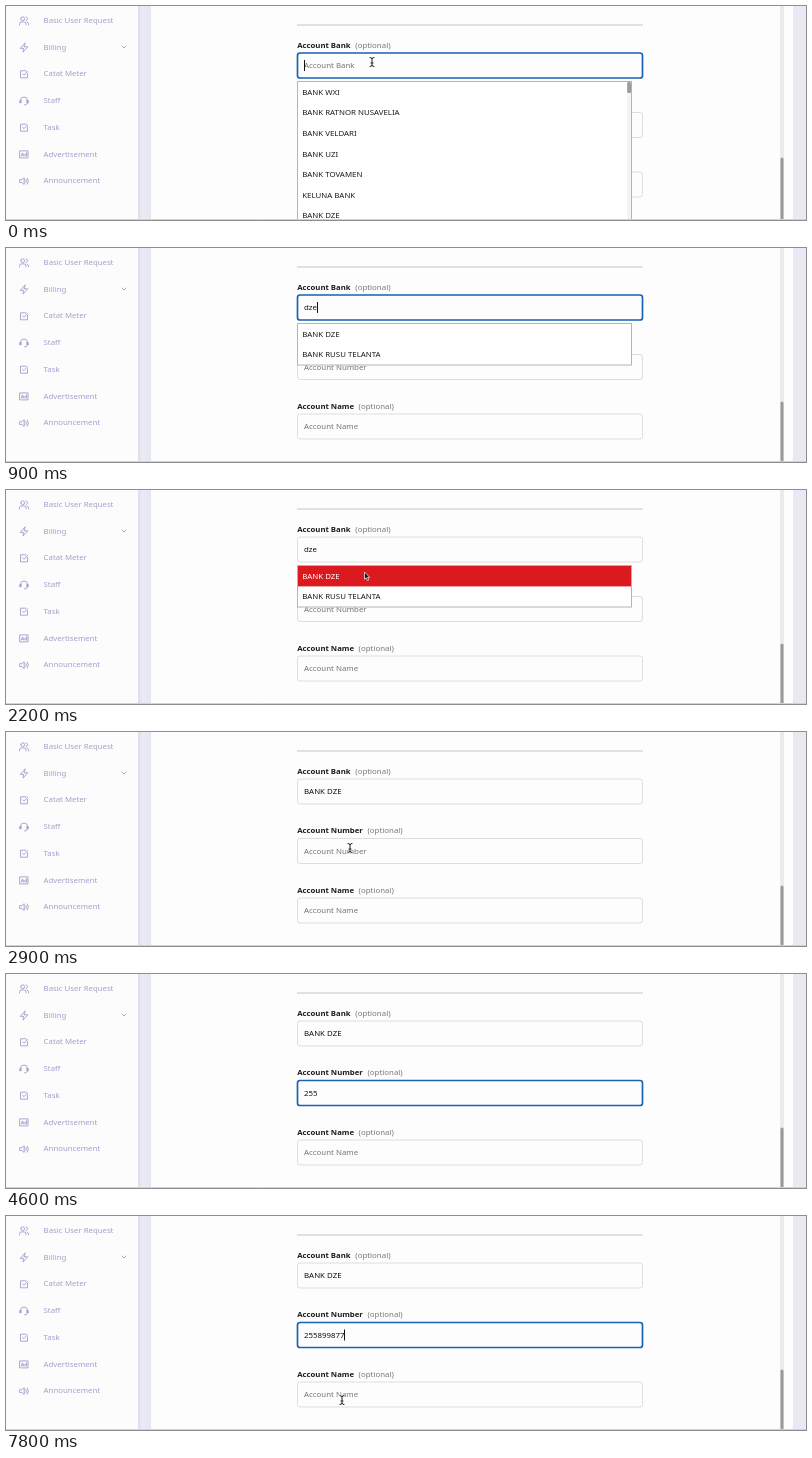
An HTML page for the animation above (8000 ms loop, 800x214 px).

```html
<!DOCTYPE html>
<html lang="en">
<head>
<meta charset="utf-8">
<title>Bank account form</title>
<style>
  html, body { margin: 0; width: 100%; height: 100%; overflow: hidden; background: #fcfcfd; }
  svg { display: block; width: 800px; height: 214px; font: 7.87px "Noto Sans", sans-serif; }
  .nav text { font-size: 7.8px; font-weight: 500; fill: #a39fca; }
  .nav path, .nav circle { fill: none; stroke: #a39fca; stroke-width: .9; stroke-linecap: round; stroke-linejoin: round; }
  .label { font-size: 7.75px; font-weight: 700; fill: #1c1c1e; }
  .optional { fill: #777; }
  .box { fill: #fdfdfd; stroke: #dedede; stroke-width: 1; }
  .box.focus { stroke: #1a62b5; stroke-width: 1.7; }
  .value { fill: #111; white-space: pre; }
  .value.empty { fill: #747474; }
  .option { fill: #1c1c1e; }
  .option.hover { fill: #fff; }
</style>
</head>
<body>
<svg id="stage" viewBox="0 0 800 214">
  <defs>
    <linearGradient id="gutter">
      <stop offset="0" stop-color="#dedfed"/>
      <stop offset=".35" stop-color="#eaebf4"/>
      <stop offset="1" stop-color="#e4e6f1"/>
    </linearGradient>
  </defs>
  <rect width="800" height="214" fill="#fcfcfd"/>
  <rect x="132" width="13" height="214" fill="url(#gutter)"/>
  <rect x="145" width="642" height="214" fill="#fdfdfd"/>
  <rect x="787" width="13" height="214" fill="#e8e9f3"/>
  <rect x="774" width="4" height="214" fill="#ebebed"/>
  <rect id="pageThumb" x="774.5" width="3" height="80" rx="1.5" fill="#99999b"/>
  <path d="M291 19H637" stroke="#c6c6c6"/>
  <g id="nav" class="nav"></g>
  <g id="fields"></g>
  <g id="list">
    <rect id="panel" x="291.5" y="75.5" width="334" fill="#fff" stroke="#b4b4b4"/>
    <rect id="highlight" x="292" y="76" width="333" height="20.4" fill="#db1a20"/>
    <g id="options"></g>
    <g id="listBar">
      <rect x="621" y="76" width="4" height="140" fill="#f4f4f4"/>
      <rect x="621.2" y="76" width="3.8" height="11" rx="1.5" fill="#9b9b9b"/>
    </g>
  </g>
  <path id="caret" d="M0 -5.5V5.5" stroke="#111" stroke-width="1"/>
  <path d="M0 213.5H800" stroke="#d2d2d4"/>
  <g id="beam" fill="none" stroke-linecap="round">
    <path d="M-2 -4.5Q0 -4.5 0 -3Q0 -4.5 2 -4.5M0 -3V3M-2 4.5Q0 4.5 0 3Q0 4.5 2 4.5M-1 1H1" stroke="#fff" stroke-width="2"/>
    <path d="M-2 -4.5Q0 -4.5 0 -3Q0 -4.5 2 -4.5M0 -3V3M-2 4.5Q0 4.5 0 3Q0 4.5 2 4.5M-1 1H1" stroke="#222" stroke-width="1"/>
  </g>
  <path id="arrow" d="M-1.5 -4V3.2L.2 1.8L1.4 4.6L2.7 4L1.5 1.4H3.7Z" fill="#111" stroke="#fff" stroke-width=".7"/>
</svg>
<script>
const LOOP = 8000, STEP = 100;
const $ = id => document.getElementById(id);

function add(parent, tag, attrs, text) {
  const node = document.createElementNS('http://www.w3.org/2000/svg', tag);
  for (const key in attrs) node.setAttribute(key, attrs[key]);
  if (text) node.textContent = text;
  return parent.appendChild(node);
}
const show = (node, on) => node.style.display = on ? '' : 'none';

// Icon paths are centred on the origin
const tick = 'M3.5 -1V3.5H-3.5V-3.5H2M-1.5 -.5L0 1L3.5 -3';
const icons = {
  users: 'M-4.5 4V3Q-4.5 1 -2.5 1H0Q2 1 2 3V4M-3.2 -2.2A1.9 1.9 0 1 0 .6 -2.2A1.9 1.9 0 1 0 -3.2 -2.2M2 -4Q3.6 -3.6 3.6 -2.2T2 -.4M3 1.2Q4.6 1.6 4.6 3V4',
  bolt: 'M1 -4.5L-3.8 .8H-.4L-1 4.5L3.8 -.8H.4Z',
  tick,
  headset: 'M-3.5 1V-.5A3.5 3.5 0 0 1 3.5 -.5V1M-3.5 -.5H-4.3V1.8H-2.8V-.5ZM3.5 -.5H4.3V1.8H2.8V-.5ZM3.5 2Q3.5 4 .5 4',
  ad: 'M-4 -3.5H4V3.5H-4ZM-2.6 1.6L-1.5 -1.5L-.4 1.6M-2.2 .7H-.8M2.6 -1.6V1.6H1.6Q.6 1.6 .6 .6T1.6 -.4H2.6',
  speaker: 'M-4 -1.4H-2.2L.2 -3.4V3.4L-2.2 1.4H-4ZM2 -1.6Q3 0 2 1.6M3.4 -3Q5.4 0 3.4 3'
};
[['users', 'Basic User Request'], ['bolt', 'Billing'], ['tick', 'Catat Meter'], ['headset', 'Staff'],
 ['tick', 'Task'], ['ad', 'Advertisement'], ['speaker', 'Announcement']].forEach(([icon, name], i) => {
  const y = 14.3 + 26.7 * i;
  add($('nav'), 'path', { d: icons[icon], transform: `translate(18 ${y + .6})` });
  add($('nav'), 'text', { x: 37.6, y: y + 2.7 }, name);
});
add($('nav'), 'path', { d: 'M116 40L118 42L120 40' });

const fields = [['Account Bank', 349.3], ['Account Number', 361.5], ['Account Name', 352.6]].map(([name, optionalX], i) => {
  const y = 59.5 + 59.5 * i, root = $('fields');
  add(root, 'text', { x: 291.2, y: y - 17.8, class: 'label' }, name);
  add(root, 'text', { x: optionalX, y: y - 17.8, class: 'optional' }, '(optional)');
  const box = add(root, 'rect', { x: 291.5, y: y - 12.5, width: 345, height: 25, rx: 2.5, class: 'box' });
  const text = add(root, 'text', { x: 298, y: y + 2.8, class: 'value' });
  return { name, y, box, text };
});

const allBanks = ['BANK WXI', 'BANK RATNOR NUSAVELIA', 'BANK VELDARI', 'BANK UZI', 'BANK TOVAMEN', 'KELUNA BANK', 'BANK DZE'];
const matches = ['BANK DZE', 'BANK RUSU TELANTA'];
const options = allBanks.map((_, i) => add($('options'), 'text', { x: 296.2, y: 88.8 + 20.58 * i, class: 'option' }));

// Each entry is [start time, value]
const bankSteps = [[0, ''], [600, 'd'], [800, 'dz'], [900, 'dze'], [2300, 'BANK DZE']];
const digits = '255899877';
const digitTimes = [3600, 3900, 4100, 5100, 5300, 5700, 6300, 6500, 6700];
const caretSteps = [[0, 1], [200, 0], [600, 1], [1400, 0], [1900, 1], [2100, 0], [3200, 1], [4600, 0],
  [5000, 1], [6200, 0], [6300, 1], [7200, 0], [7700, 1]];
const at = (steps, t) => steps.filter(([start]) => start <= t).pop()[1];

// Each run is a list of [time, x, y]; the pointer is hidden between runs
const pointerRuns = [
  [[0, 366, 56], [600, 366, 56]],
  [[1000, 366, 57], [1300, 364, 68], [1600, 361, 82], [1900, 360, 86], [2500, 360, 86], [2900, 344, 116],
   [3100, 344, 116], [3200, 396, 157], [3600, 396, 157]],
  [[7100, 343, 162], [7400, 342, 184], [7600, 339, 188], [7800, 336, 184], [8000, 336, 184]]
];
function pointerAt(t) {
  const run = pointerRuns.find(r => t >= r[0][0] && t < r[r.length - 1][0]);
  if (!run) return null;
  const i = run.findIndex(p => p[0] > t);
  const [t0, x0, y0] = run[i - 1], [t1, x1, y1] = run[i];
  const k = (t - t0) / (t1 - t0);
  return { x: x0 + (x1 - x0) * k, y: y0 + (y1 - y0) * k };
}

function render(t) {
  const open = t < 2300, filtered = t >= 800;
  const pointer = pointerAt(t);
  const hover = open && filtered && pointer && pointer.y > 76;
  const focus = t < 2100 ? 0 : t >= 3200 ? 1 : -1;
  const values = [at(bankSteps, t), digits.slice(0, digitTimes.filter(d => d <= t).length), ''];

  fields.forEach((field, i) => {
    field.box.classList.toggle('focus', i === focus);
    field.text.classList.toggle('empty', !values[i]);
    field.text.textContent = values[i] || field.name;
  });

  show($('list'), open);
  show($('listBar'), !filtered);
  show($('highlight'), hover);
  $('panel').setAttribute('height', filtered ? 41.5 : 150);
  const names = filtered ? matches : allBanks;
  options.forEach((option, i) => {
    option.textContent = names[i] || '';
    option.classList.toggle('hover', Boolean(hover) && i === 0);
  });
  $('pageThumb').setAttribute('y', filtered ? 153.5 : 151.5);

  show($('caret'), focus >= 0 && at(caretSteps, t));
  if (focus >= 0) {
    const { text, y } = fields[focus];
    const width = values[focus] ? text.getComputedTextLength() : 0;
    $('caret').setAttribute('transform', `translate(${Math.floor(298.3 + width) + .5} ${y})`);
  }

  const overField = pointer && fields.some(f => Math.abs(pointer.y - f.y) < 13) && !hover && !(open && pointer.y > 75);
  show($('beam'), overField);
  show($('arrow'), pointer && !overField);
  if (pointer) {
    for (const id of ['beam', 'arrow']) $(id).setAttribute('transform', `translate(${pointer.x} ${pointer.y})`);
  }
}

const start = performance.now();
function tickFrame() {
  const t = (performance.now() - start) % LOOP;
  render(Math.floor(t / STEP) * STEP);
  requestAnimationFrame(tickFrame);
}
tickFrame();
</script>
</body>
</html>
```
